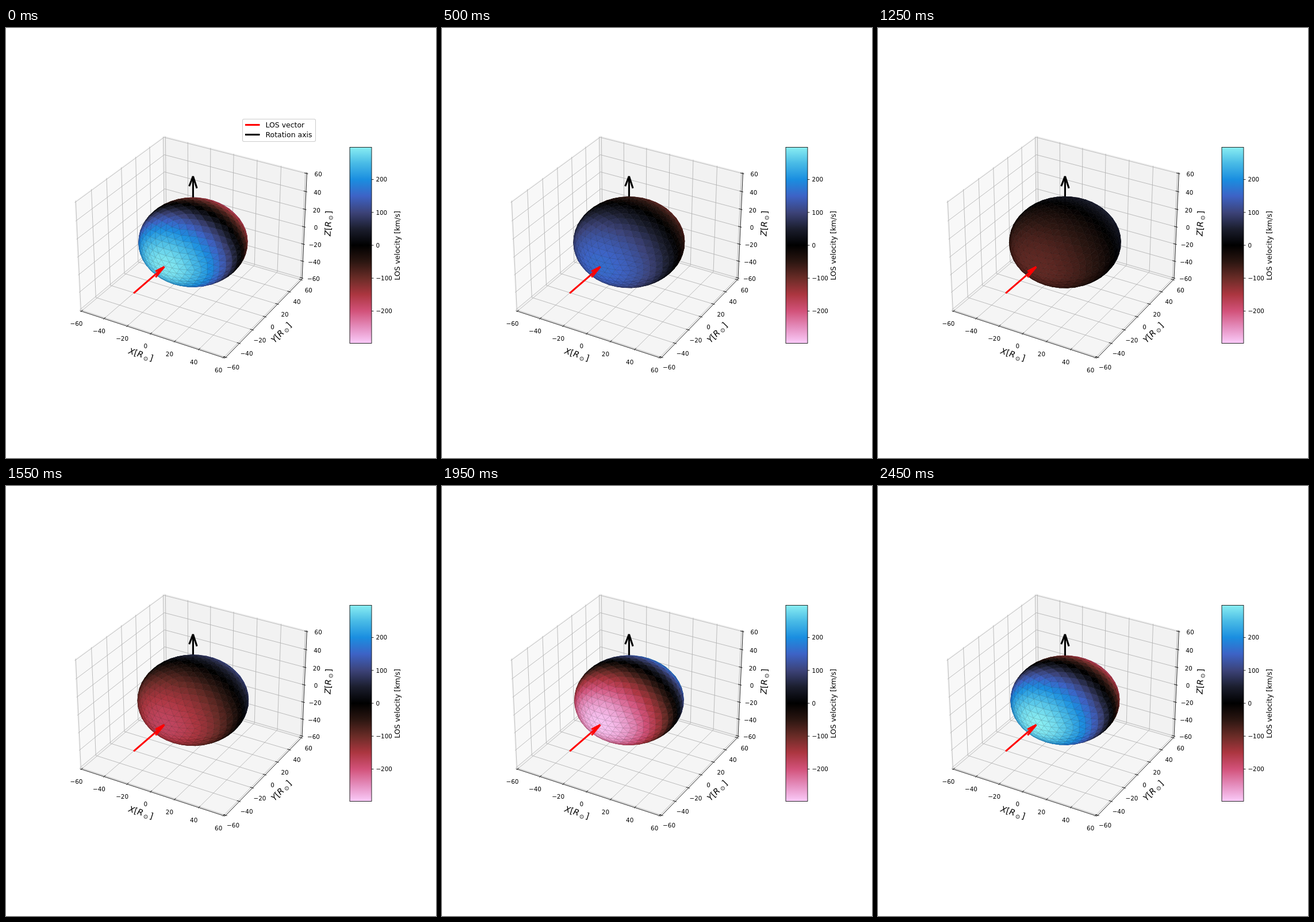
These frames come from a looping animation (748x748 px, 2500 ms). An HTML page with a canvas:

```html
<!DOCTYPE html>
<html>
<head>
<meta charset="utf-8">
<style>
html, body { margin: 0; width: 100%; height: 100%; overflow: hidden; background: #fff; }
canvas { display: block; }
</style>
</head>
<body>
<canvas id="stage" width="748" height="748"></canvas>
<script>
const ctx = document.getElementById('stage').getContext('2d');
const PT = 1.039, THIN = 0.8 * PT, THICK = 3 * PT;
const FONT = '"DejaVu Sans", Verdana, sans-serif';
const EDGE = 61.25, VMAX = 298, STEP = 50, LOOP = 2500;

// Perspective view, azimuth -60 and elevation 30 degrees
function project(x, y, z) {
  const k = 0.5952 / EDGE;
  x *= k; y *= k; z *= 0.75 * k;
  const s = 2428 / (10 - (0.433 * x - 0.75 * y + 0.5 * z));
  return [325.4 + s * (0.866 * x + 0.5 * y), 372 - s * (-0.25 * x + 0.433 * y + 0.866 * z)];
}

function trace(points) {
  ctx.beginPath();
  points.forEach(p => ctx.lineTo(...(p.length === 3 ? project(...p) : p)));
}

function line(points, color, width) {
  trace(points);
  ctx.strokeStyle = color;
  ctx.lineWidth = width;
  ctx.stroke();
}

function rotated(x, y, degrees, paint) {
  ctx.save();
  ctx.translate(x, y);
  ctx.rotate(degrees * Math.PI / 180);
  ctx.fillStyle = '#000';
  paint();
  ctx.restore();
}

function text(str, x, y, points, align = 'center', degrees = 0) {
  const size = points * PT;
  rotated(x, y, degrees, () => {
    ctx.font = `${size}px ${FONT}`;
    ctx.textAlign = align;
    ctx.fillText(String(str).replace('-', '\u2212'), 0, size * 0.365);
  });
}

// Evenly spaced key colours from -300 to 300 km/s
const COLORS = 'fbcdfb e58fbf d2527a ac3640 6a2c27 2b1611 000000 1b1e2e 3c4379 3d63c6 1a8ee0 49bbe6 8cf0f3'
  .split(' ').map(hex => [0, 2, 4].map(i => parseInt(hex.slice(i, i + 2), 16)));

function colorOf(v) {
  const x = v / 50 + 6, i = Math.floor(x);
  return `rgb(${COLORS[i].map((c, j) => Math.round(c + (x - i) * (COLORS[i + 1][j] - c)))})`;
}

// Unit icosphere, sorted from back to front
function icosphere(levels) {
  const phi = (1 + Math.sqrt(5)) / 2, corners = [];
  for (const a of [-1, 1]) for (const b of [-phi, phi])
    corners.push([a, b, 0], [0, a, b], [b, 0, a]);
  const unit = p => p.map(c => c / Math.hypot(...p));
  const mid = (p, q) => unit(p.map((c, i) => c + q[i]));
  const near = (p, q) => Math.hypot(...p.map((c, i) => c - q[i])) < 2.1;
  let faces = [];
  corners.forEach((a, i) => corners.forEach((b, j) => corners.forEach((c, k) => {
    if (i < j && j < k && near(a, b) && near(b, c) && near(a, c)) faces.push([a, b, c].map(unit));
  })));
  while (levels--) faces = faces.flatMap(([a, b, c]) => {
    const ab = mid(a, b), bc = mid(b, c), ca = mid(c, a);
    return [[a, ab, ca], [b, bc, ab], [c, ca, bc], [ab, bc, ca]];
  });
  return faces.map(points => {
    const n = unit([0, 1, 2].map(i => points[0][i] + points[1][i] + points[2][i]));
    return { points, facing: -n[1], depth: 0.433 * n[0] - 0.75 * n[1] + 0.375 * n[2] };
  }).sort((p, q) => p.depth - q.depth).filter(f => f.depth > -0.25);
}
const MESH = icosphere(3);

// Slow, nearly linear decline, then a quick smooth rise
function velocity(t) {
  const ramp = (t0, v0, t1, v1) => v0 + (v1 - v0) * (t - t0) / (t1 - t0);
  if (t < 500) return ramp(0, 293, 500, 160);
  if (t < 900) return ramp(500, 160, 900, 7);
  if (t < 1970) return ramp(900, 7, 1970, -VMAX);
  return -VMAX * Math.cos(Math.PI * (t - 1970) / 480);
}

// The radius is the velocity summed over time
function radius(t) {
  let r = 40.15;
  for (let s = 0; s < t; s += STEP) r += velocity(s) * STEP * 6.65e-6;
  return r;
}

function axisLabel(letter, x, y, degrees) {
  const size = 14 * PT;
  const parts = [[letter, 'italic'], ['[', ''], ['R', 'italic'], ['\u2009\u2299\u2009', 'sub'], [']', '']];
  const setFont = style => {
    ctx.font = style === 'sub' ? `${size * 0.7}px ${FONT}` : `${style} ${size}px ${FONT}`;
  };
  rotated(x, y, degrees, () => {
    ctx.textAlign = 'left';
    const widths = parts.map(([str, style]) => { setFont(style); return ctx.measureText(str).width; });
    let left = -widths.reduce((a, b) => a + b) / 2;
    parts.forEach(([str, style], i) => {
      setFont(style);
      ctx.fillText(str, left, size * (style === 'sub' ? 0.45 : 0.27));
      left += widths[i];
    });
  });
}

function drawPane(place, gray) {
  trace([[-EDGE, -EDGE], [-EDGE, EDGE], [EDGE, EDGE], [EDGE, -EDGE]].map(place));
  ctx.closePath();
  ctx.fillStyle = ctx.strokeStyle = `rgba(${gray},${gray},${gray},.5)`;
  ctx.lineWidth = PT;
  ctx.fill();
  ctx.stroke();
}

function drawBox() {
  const e = EDGE;
  drawPane(([a, b]) => [-e, a, b], 242);
  drawPane(([a, b]) => [a, e, b], 230);
  drawPane(([a, b]) => [a, b, -e], 236);
  for (let t = -60; t <= 60; t += 20) {
    line([[t, -e, -e], [t, e, -e], [t, e, e]], '#b0b0b0', THIN);
    line([[e, t, -e], [-e, t, -e], [-e, t, e]], '#b0b0b0', THIN);
    line([[-e, -e, t], [-e, e, t], [e, e, t]], '#b0b0b0', THIN);
  }
  line([[-e, -e, -e], [e, -e, -e], [e, e, -e], [e, e, e]], '#000', THIN);
  for (let t = -60; t <= 60; t += 20) {
    line([[t, -e + 2, -e], [t, -e - 1, -e]], '#000', THIN);
    line([[e - 2, t, -e], [e + 1, t, -e]], '#000', THIN);
    line([[e - 2, e, t], [e + 1, e, t]], '#000', THIN);
    const put = ([x, y], dx, dy) => text(t, x + dx, y + dy, 10);
    put(project(t, -e, -e), -8.6, 21.6);
    put(project(e, t, -e), 12.6, 17.8);
    put(project(e, e, t), 19.8, 1.3);
  }
  axisLabel('X', 234.5, 569, 18);
  axisLabel('Y', 479.5, 530.5, -45.6);
  axisLabel('Z', 561.5, 340, -87.7);
}

function drawColorbar() {
  const x = 598, y = 207.5, w = 38, h = 341;
  const part = v => (VMAX - v) / (2 * VMAX);
  const fill = ctx.createLinearGradient(0, y, 0, y + h);
  for (let i = -6; i <= 6; i++) {
    const v = Math.max(-VMAX, Math.min(VMAX, i * 50));
    fill.addColorStop(part(v), colorOf(v));
  }
  ctx.fillStyle = fill;
  ctx.fillRect(x, y, w, h);
  ctx.strokeStyle = '#000';
  ctx.lineWidth = THIN;
  ctx.strokeRect(x, y, w, h);
  for (let v = -200; v <= 200; v += 100) {
    const ty = y + h * part(v);
    line([[x + w, ty], [x + w + 3.6, ty]], '#000', THIN);
    text(v, x + w + 7.4, ty, 10, 'left');
  }
  text('LOS velocity [km/s]', 680.5, 378.5, 12, 'center', -90);
}

function drawSphere(t) {
  const r = radius(t), v = velocity(t);
  ctx.lineJoin = 'round';
  for (const { points, facing } of MESH) {
    trace(points.map(p => p.map(c => c * r)));
    ctx.closePath();
    ctx.fillStyle = ctx.strokeStyle = colorOf(v * facing);
    ctx.fill();
    ctx.lineWidth = 0.5;
    ctx.stroke();
    ctx.strokeStyle = 'rgba(0,0,0,.5)';
    ctx.lineWidth = 0.25;
    ctx.stroke();
  }
  ctx.lineJoin = 'miter';
}

function drawArrow(from, tip, barbs, color) {
  for (const end of [from, ...barbs]) line([end, tip], color, THICK);
}

function drawLegend() {
  ctx.beginPath();
  ctx.roundRect(411.5, 158.5, 127, 39, 2.5);
  ctx.fillStyle = 'rgba(255,255,255,.8)';
  ctx.fill();
  ctx.strokeStyle = '#ccc';
  ctx.lineWidth = PT;
  ctx.stroke();
  const entry = (name, color, y) => {
    line([[416, y], [441.5, y]], color, THICK);
    text(name, 451.5, y + 0.3, 12, 'left');
  };
  entry('LOS vector', '#f00', 168.5);
  entry('Rotation axis', '#000', 185.5);
}

function draw(now) {
  const t = Math.floor(now % LOOP / STEP) * STEP;
  ctx.fillStyle = '#fff';
  ctx.fillRect(0, 0, 748, 748);
  drawBox();
  drawColorbar();
  drawArrow([0, 0, 31.3], [0, 0, 72.5], [[-3.2, 0, 60.6], [3.2, 0, 60.6]], '#000');
  drawSphere(t);
  drawArrow([0, -82.3, 0], [0, -41.2, 0], [[0, -53.1, -3.2], [0, -53.1, 3.2]], '#f00');
  if (t === 0) drawLegend();
}

const start = performance.now();
function tick() {
  draw(performance.now() - start);
  requestAnimationFrame(tick);
}
tick();
</script>
</body>
</html>
```
